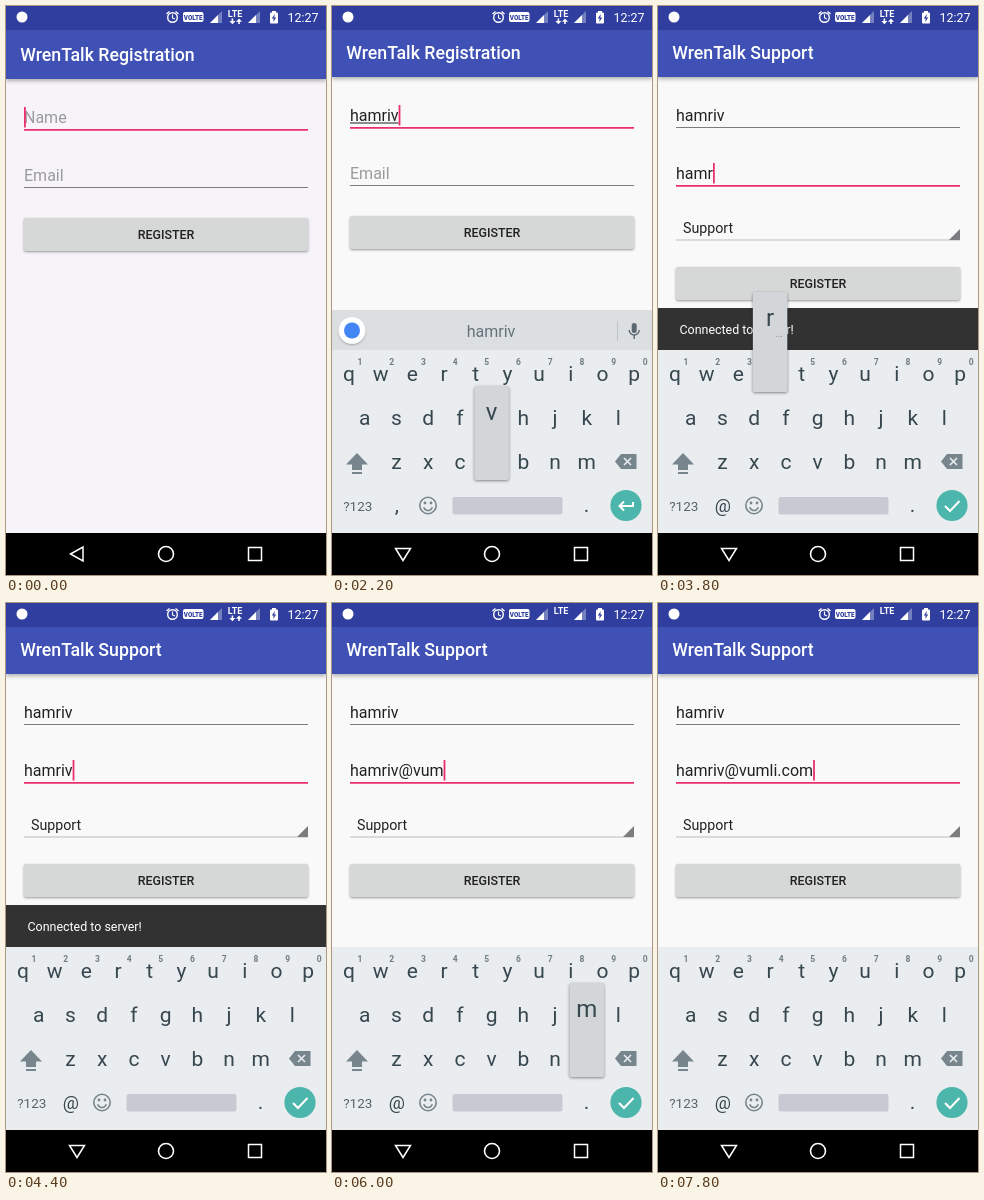
An HTML page with a canvas that plays this animation: 320x569 px, repeating every 8000 ms.

```html
<!DOCTYPE html>
<html lang="en">
<head>
<meta charset="utf-8">
<style>
  html, body { margin: 0; height: 100%; overflow: hidden; background: #000; }
  canvas { display: block; width: 320px; height: 569px; }
</style>
</head>
<body>
<canvas></canvas>
<script>
const W = 320, H = 569, LOOP = 8000, STEP = 200;
const PINK = '#ea2f6c', KEY = '#37474f', ICON = '#77858c', BOARD = '#eaedef';
const canvas = document.querySelector('canvas');
const ratio = window.devicePixelRatio || 1;
canvas.width = W * ratio;
canvas.height = H * ratio;
const c = canvas.getContext('2d');
c.scale(ratio, ratio);

// Each entry: start time, typed text, keys shown as pop-ups, word suggestions
const nameTyping = [
  [0, '', '', []],
  [1400, 'h', 'ha', ['h', 'house', 'hot']],
  [1600, 'ha', 'am', ['ha', 'had', 'has']],
  [1800, 'ham', 'r', ['ham', 'hammer', 'hams']],
  [2000, 'hamri', 'i', ['hamri']],
  [2200, 'hamriv', 'v', ['hamriv']],
  [2400, 'hamriv', '', ['hamriv']]
];
const emailTyping = [
  [0, '', ''], [3200, 'h', 'h'], [3400, 'ha', 'a'], [3600, 'ham', 'm'],
  [3800, 'hamr', 'r'], [4000, 'hamri', 'i'], [4200, 'hamriv', 'v'],
  [4400, 'hamriv', ''], [4800, 'hamriv@', '@'], [5000, 'hamriv@', ''],
  [5400, 'hamriv@v', 'v'], [5600, 'hamriv@vu', 'u'], [5800, 'hamriv@vu', ''],
  [6000, 'hamriv@vum', 'm'], [6200, 'hamriv@vuml', 'l'],
  [6600, 'hamriv@vumli', 'i'], [6800, 'hamriv@vumli', ''],
  [7200, 'hamriv@vumli.', '.'], [7400, 'hamriv@vumli.c', 'c'],
  [7600, 'hamriv@vumli.com', 'm'], [7800, 'hamriv@vumli.com', '']
];
const EMAIL_FOCUS = 2600, SUPPORT = 3000;

// Key centres: every row is centred on the same axis
const PITCH = 31.7, AXIS = 159.6;
const keys = { ',': [64.8, 500], '@': [64.8, 500], '.': [254.5, 500] };
['qwertyuiop', 'asdfghjkl', 'zxcvbnm'].forEach((row, r) =>
  [...row].forEach((ch, i) =>
    keys[ch] = [AXIS + (i - (row.length - 1) / 2) * PITCH, 368 + 44 * r]));

const stateAt = (list, t) => list.filter(entry => entry[0] <= t).pop();
const ramp = (t, from, to) => Math.min(1, Math.max(0, (t - from) / (to - from)));
const easeOut = p => 1 - (1 - p) ** 2;

function rect(x, y, w, h, color, radius = 0) {
  c.fillStyle = color;
  c.beginPath();
  c.roundRect(x, y, w, h, radius);
  c.fill();
}

function text(str, x, y, size, color, align = 'left', weight = 400) {
  c.font = `${weight} ${size}px Roboto, sans-serif`;
  c.fillStyle = color;
  c.textAlign = align;
  c.fillText(str, x, y);
  return c.measureText(str).width;
}

function path(points, color, stroke = 0, close = true) {
  c.beginPath();
  for (let i = 0; i < points.length; i += 2) c.lineTo(points[i], points[i + 1]);
  if (close) c.closePath();
  paint(color, stroke);
}

function circle(x, y, r, color, stroke = 0, from = 0, to = Math.PI * 2) {
  c.beginPath();
  c.arc(x, y, r, from, to);
  paint(color, stroke);
}

function paint(color, stroke) {
  c.lineWidth = stroke;
  c.strokeStyle = c.fillStyle = color;
  stroke ? c.stroke() : c.fill();
}

function withShadow(blur, dy, alpha, draw) {
  c.save();
  c.shadowColor = `rgba(0,0,0,${alpha})`;
  c.shadowBlur = blur * ratio;
  c.shadowOffsetY = dy * ratio;
  draw();
  c.restore();
}

function statusBar(t) {
  rect(0, 0, W, 24, '#303f9f');
  circle(16, 11, 5.5, '#fff');
  circle(166.5, 11.5, 4.8, '#fff', 1.4);
  path([166.5, 8.5, 166.5, 12, 169, 13], '#fff', 1.1, false);
  path([160.5, 8, 163.5, 5.5], '#fff', 1.4, false);
  path([169.5, 5.5, 172.5, 8], '#fff', 1.4, false);
  rect(177, 6, 20.5, 10, '#fff', 2);
  text('VOLTE', 187.2, 13.6, 6.3, '#303f9f', 'center', 900);
  for (const x of [204, 242]) {
    path([x, 17, x + 12, 17, x + 12, 5], '#7580bf');
    path([x, 17, x + 8, 17, x + 8, 9], '#fff');
  }
  text('LTE', 229, 11, 9, '#fff', 'center', 700);
  if (t < 5000) {
    rect(225.6, 12.5, 1.6, 3, '#fff');
    path([223.4, 15, 229.4, 15, 226.4, 18.2], '#fff');
    rect(232.2, 15, 1.6, 3, '#fff');
    path([230, 15.7, 236, 15.7, 233, 12.5], '#fff');
  }
  rect(264, 6.5, 8, 11, '#fff', 1);
  rect(266, 5, 4, 2, '#fff');
  path([268.8, 8, 265.8, 12.5, 267.7, 12.5, 267.2, 16, 270.2, 11.4, 268.3, 11.4], '#303f9f');
  text('12:27', 312.5, 15.5, 12.44, '#fff', 'right');
}

function field(y, value, hint, focused, composing) {
  const width = text(value, 18, y - 7, 16, '#212121');
  if (!value) text(hint, 18, y - 7, 16, '#9a9a9c');
  if (composing && value) rect(18, y - 5.5, width, 1, '#212121');
  if (focused) {
    rect(18 + width, y - 23, 1.8, 20.5, PINK);
    rect(18, y - 1, 284, 1.8, PINK);
  } else {
    rect(18, y - 1, 284, 1, '#7d7d7f');
  }
}

function form(t, name, email) {
  const support = t >= SUPPORT, onEmail = t >= EMAIL_FOCUS;
  rect(0, 0, W, H, t < STEP ? '#f6f4f8' : '#f9f9fa');
  withShadow(4, 1.5, 0.3, () => rect(0, 20, W, 51, '#3f51b5'));
  text('WrenTalk ' + (support ? 'Support' : 'Registration'), 14.2, 53, 17.78, '#fff', 'left', 500);
  field(122, name, 'Name', !onEmail, !onEmail);
  field(180, email, 'Email', onEmail, false);
  if (support) {
    text('Support', 25, 226.5, 14.22, '#212121');
    rect(18, 233.5, 284, 1, '#bdbdbd');
    path([302, 223, 302, 234, 291, 234], '#7d7d7f');
  }
  const top = support ? 261 : 210;
  withShadow(2.5, 1, 0.4, () => rect(18, top, 284, 33, '#d6d7d7', 2));
  text('REGISTER', 160, top + 21, 12.44, '#212121', 'center', 500);
}

function snackbar(t) {
  const shown = easeOut(ramp(t, 2800, 3200)) - ramp(t, 5600, 6000);
  if (shown <= 0) return;
  const y = 344 - 42 * shown;
  rect(0, y, W, 42, '#323232');
  text('Connected to server!', 21.5, y + 26, 12.44, '#fff');
}

function suggestionBar(words) {
  rect(0, 304, W, 40, '#dcdfe1');
  withShadow(2, 1, 0.25, () => circle(20, 324.5, 13.5, '#fff'));
  circle(20, 324.5, 8, '#4285f4');
  const single = words.length === 1;
  words.forEach((word, i) => text(word, single ? 159 : 73 + 86 * i, 330.5, 16, '#64727a', 'center'));
  for (const x of single ? [285] : words.length ? [114, 205] : []) rect(x, 315, 1, 20, '#bcc3c7');
  rect(299.7, 317, 5, 10, '#5b686f', 2.5);
  circle(302.2, 324, 5, '#5b686f', 1.4, 0, Math.PI);
  rect(301.5, 329, 1.4, 4, '#5b686f');
}

function keyboard(t, words) {
  const onEmail = t >= EMAIL_FOCUS;
  c.save();
  c.translate(0, 226 * (1 - easeOut(ramp(t, 200, 800))));
  rect(0, 344, W, 190, BOARD);
  if (!onEmail) suggestionBar(words);
  for (const ch in keys) {
    if (ch === (onEmail ? ',' : '@')) continue;
    const [x, y] = keys[ch];
    text(ch, x, y + (y === 500 ? 5.5 : 7), ch === '@' ? 18 : 21, KEY, 'center');
  }
  [...'1234567890'].forEach((digit, i) =>
    text(digit, 28 + PITCH * i, 359, 8.5, '#6f7d84', 'center', 700));

  path([25, 447, 36, 458.5, 30, 458.5, 30, 464, 20, 464, 20, 458.5, 14, 458.5], ICON);
  rect(20, 466, 10, 2, ICON);
  path([283, 455.5, 289, 448, 304.5, 448, 304.5, 463, 289, 463], ICON);
  path([292, 452, 299, 459], BOARD, 1.6, false);
  path([299, 452, 292, 459], BOARD, 1.6, false);

  text('?123', 25.8, 504.5, 13.5, '#55636b', 'center');
  circle(96, 499.5, 8.2, ICON, 1.6);
  circle(93, 497, 1.4, ICON);
  circle(99, 497, 1.4, ICON);
  circle(96, 500, 4.5, ICON, 1.6, 0.3, Math.PI - 0.3);
  rect(120.5, 491, 110, 17.5, '#c7cad3', 2);
  circle(294, 499.5, 15.6, '#4db6ac');
  if (onEmail) {
    path([287, 500, 292, 505, 301.5, 495], '#fff', 2, false);
  } else {
    path([301, 496, 301, 500, 287.5, 500], '#fff', 2, false);
    path([292, 495.5, 287.5, 500, 292, 504.5], '#fff', 2, false);
  }
  c.restore();
}

function popup(ch) {
  const [x, y] = keys[ch];
  const lift = y > 420 ? 76 : 82;
  withShadow(3, 1, 0.45, () => rect(x - 17.2, y - lift, 34.5, lift + 18, '#d3d6d9', 2));
  text(ch, x, y - lift + 34, 24, KEY, 'center');
  if ('aeiour'.includes(ch)) text('...', x + 9, y - lift + 45, 10, '#7b888f', 'center');
}

function navBar(t) {
  rect(0, 527, W, 42, '#000');
  path(t < 400 ? [64.5, 548, 77, 541, 77, 555] : [63.5, 542.5, 78.5, 542.5, 71, 554.5], '#fff', 1.5);
  circle(160, 548, 7.5, '#fff', 1.6);
  path([242.5, 541.5, 255.5, 541.5, 255.5, 554.5, 242.5, 554.5], '#fff', 1.5);
}

function draw(t) {
  const [, name, namePops, words] = stateAt(nameTyping, t);
  const [, email, emailPops] = stateAt(emailTyping, t);
  c.save();
  c.translate(0, t < STEP ? 2 : 0);
  form(t, name, email);
  c.restore();
  statusBar(t);
  snackbar(t);
  keyboard(t, words);
  [...(t < EMAIL_FOCUS ? namePops : emailPops)].forEach(popup);
  navBar(t);
}

const start = performance.now();
function tick() {
  const t = (performance.now() - start) % LOOP;
  draw(Math.floor(t / STEP) * STEP);
  requestAnimationFrame(tick);
}
tick();
</script>
</body>
</html>
```
